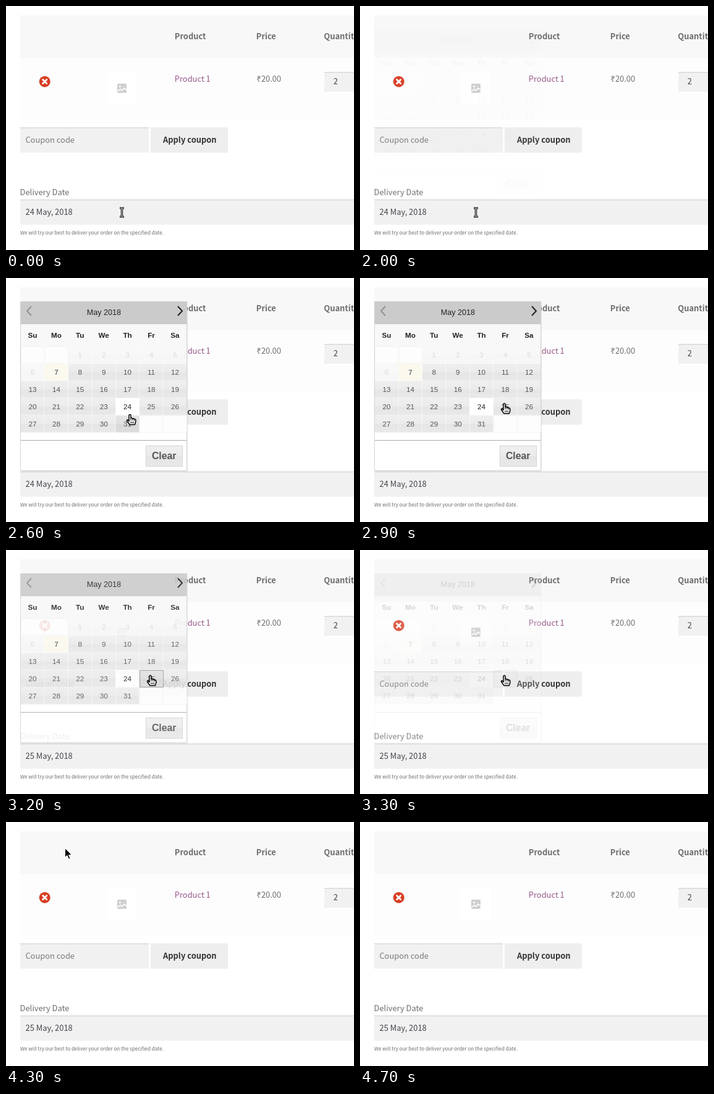
Write an HTML page that moves like this. It is 563 by 396 pixels and loops after 5.4 s.

```html
<!DOCTYPE html>
<html lang="en">
<head>
<meta charset="utf-8">
<title>Delivery date picker</title>
<style>
html, body { margin: 0; width: 100%; height: 100%; overflow: hidden; background: #fff; }
svg { display: block; width: 563px; height: 396px; }
text { font: 12.9px "Noto Sans CJK JP", "Noto Sans CJK SC", "Noto Sans", sans-serif; fill: #6d6d6d; white-space: pre; }
text.b { font-weight: 600; }
#cal text { font: 11.7px "Liberation Sans", Arial, sans-serif; text-anchor: middle; fill: #555; }
#cal text.th { font-weight: 700; fill: #222; }
#cal text.title { font-size: 12.6px; fill: #222; }
#cal text.clear { font-size: 15.8px; font-weight: 700; }
</style>
</head>
<body>
<svg viewBox="0 0 563 396" xmlns="http://www.w3.org/2000/svg">
  <defs>
    <linearGradient id="cell" x2="0" y2="1">
      <stop offset="0" stop-color="#efefef"/><stop offset=".5" stop-color="#ebebeb"/>
      <stop offset=".5" stop-color="#e5e5e5"/><stop offset="1" stop-color="#e9e9e9"/>
    </linearGradient>
    <linearGradient id="hover" x2="0" y2="1">
      <stop offset="0" stop-color="#e4e4e4"/><stop offset=".5" stop-color="#dfdfdf"/>
      <stop offset=".5" stop-color="#d8d8d8"/><stop offset="1" stop-color="#dcdcdc"/>
    </linearGradient>
    <filter id="soft" x="-5%" y="-5%" width="110%" height="110%"><feGaussianBlur stdDeviation="1.2"/></filter>
  </defs>
  <g id="page"></g>
  <g id="cal"></g>
  <g id="beam" fill="none">
    <path d="M-3.5 -7H-1.5L0 -6L1.5 -7H3.5M0 -6V6M-3.5 7H-1.5L0 6L1.5 7H3.5" stroke="#000" stroke-width="3.2"/>
    <path d="M-3 -7H-1.5L0 -6L1.5 -7H3M0 -6V6M-3 7H-1.5L0 6L1.5 7H3" stroke="#fff" stroke-width="1"/>
  </g>
  <path id="arrow" d="M.5 .5V15.5L4 12.3L6.5 18.3L9 17.2L6.5 11.5H11.3Z" fill="#000" stroke="#fff"/>
  <g id="hand" stroke-linejoin="round" stroke-linecap="round">
    <path d="M-1.5 9.5V.2Q-1.5 -1.5 0 -1.5Q1.5 -1.5 1.5 .2V4.5Q3 3.6 4.3 5.2Q5.8 4.5 6.9 6Q9 5.5 9.3 7.8V10.5L7.8 15H-.5L-4.8 9Q-5.4 7 -3.8 6.9Z" fill="#fff" stroke="#000" stroke-width="1.5"/>
    <path d="M1.5 5V8M4.3 5.8V8M6.9 6.5V8.3M1.4 10.5V12.5M3.6 10.5V12.5M5.8 10.5V12.5" fill="none" stroke="#000"/>
  </g>
</svg>
<script>
const $ = id => document.getElementById(id);
const rect = (x, y, w, h, fill, extra = '') =>
  `<rect x="${x}" y="${y}" width="${w}" height="${h}" fill="${fill}" ${extra}/>`;
const text = (x, y, s, extra = '') => `<text x="${x}" y="${y}" ${extra}>${s}</text>`;
const field = (x, y, w, h) =>
  rect(x, y, w, h, '#f1f1f1') + rect(x, y, w, 1, '#d4d4d4') + rect(x, y + 1, w, 1, '#eaeaea');

function buildPage() {
  const dark = 'style="fill:#43454b"';
  return rect(23, 15, 540, 69, '#f8f8f8') + rect(23, 84, 540, 100, '#fdfdfd') +
    text(272.8, 54, 'Product', 'class="b"') +
    text(404.8, 54, 'Price', 'class="b"') +
    text(514.3, 54, 'Quantity', 'class="b"') +
    '<circle cx="62.7" cy="122.7" r="9" fill="#d83d22"/>' +
    '<path d="M59.6 119.6l6.2 6.2m0-6.2l-6.2 6.2" stroke="#fff" stroke-width="2.8" stroke-linecap="round"/>' +
    rect(163, 108, 48, 50, '#fff') +
    rect(180, 126, 15, 15, '#cfcfcf', 'rx="2"') +
    '<circle cx="184.5" cy="130.5" r="1.6" fill="#fff"/>' +
    '<path d="M181 138l4-3 3 2 3-4 4 3" fill="none" stroke="#fff" stroke-width="1.6"/>' +
    text(272.8, 123, 'Product 1', 'style="fill:#96588a"') +
    text(405.6, 123, '₹20.00') +
    field(515, 107, 48, 32) + text(529.8, 127, '2', dark) +
    field(23, 197, 208, 41) + text(31.4, 222, 'Coupon code', 'style="fill:#7a7a7a"') +
    rect(234, 197, 125, 41, '#eee') + text(254, 222, 'Apply coupon', 'class="b" style="fill:#333"') +
    text(22.6, 307, 'Delivery Date') +
    field(23, 314, 540, 41) + text(31.5, 339, '24 May, 2018', 'id="date" ' + dark) +
    text(23, 371, 'We will try our best to deliver your order on the specified date.', 'style="font-size:8.06px"');
}

function buildCalendar() {
  const colX = c => 24 + c * 38.4;
  let s = rect(24, 39, 269, 274, '#999', 'opacity=".6" filter="url(#soft)"') +
    rect(23.5, 38.5, 269, 274, '#fff', 'stroke="#d5d5d5"') +
    rect(24, 38, 268, 37, '#cbcbcb') +
    text(158.3, 60, 'May 2018', 'class="title"') +
    '<g fill="none" stroke-width="2"><path d="M41 46l-7 7.5 7 7.5" stroke="#929292"/>' +
    '<path d="M278 46l7 7.5-7 7.5" stroke="#222"/></g>' +
    rect(24, 75, 268, 36, '#f8f8f8') + rect(24, 111, 268, 140, '#fdfdfd');
  ['Su', 'Mo', 'Tu', 'We', 'Th', 'Fr', 'Sa'].forEach((d, c) => {
    s += text(colX(c) + 19, 97, d, 'class="th"');
  });
  for (let i = 0; i < 35; i++) {
    const day = i - 1, x = colX(i % 7), y = 111 + 28 * Math.floor(i / 7);
    if (day < 1 || day > 31) {
      s += rect(x + .5, y + .5, 37.4, 27, 'none', 'stroke="#f5f5f5"');
      continue;
    }
    const past = day < 7;
    const fill = day === 7 ? '#fbf9ee' : day === 24 ? '#fff' : 'url(#cell)';
    const ink = day === 7 ? '#363636' : day === 24 ? '#212121' : '#555';
    s += rect(x, y, 37.8, 27.6, fill, `id="d${day}" ${past ? 'opacity=".3"' : ''}`) +
      text(x + 19, y + 46 - 28 + .2, day, `style="fill:${past ? '#dadada' : ink}"`);
  }
  return s + rect(216.5, 195.5, 38, 27, 'none', 'id="focus" stroke="#444" stroke-dasharray="1 1"') +
    rect(24, 263, 268, 1, '#aaa') +
    rect(226.5, 272.5, 59, 33, 'url(#cell)', 'stroke="#d3d3d3"') +
    text(255.7, 294, 'Clear', 'class="clear"');
}

$('page').innerHTML = buildPage();
$('cal').innerHTML = buildCalendar();

// Pointer steps: time, shape, x, y
const steps = [
  [0, 'beam', 187.5, 335], [2200, 'beam', 185, 322], [2300, 'arrow', 178, 285],
  [2400, 'arrow', 170, 254], [2600, 'hand', 200.5, 223], [2700, 'hand', 211, 219],
  [2800, 'hand', 224, 211], [2900, 'hand', 233.5, 205], [3400, 'hand', 229, 208],
  [3500, 'beam', 222, 218], [3600, 'beam', 219, 224], [3900, 'beam', 214.5, 230],
  [4000, 'beam', 200, 205], [4100, 'arrow', 165, 150], [4200, 'arrow', 125, 90],
  [4300, 'arrow', 95, 42], [4400, 'arrow', 75, 6], [4500, 'arrow', 74, 3],
  [4600, 'arrow', 73, -6], [4700, '', 0, 0]
];
const LOOP = 5400, TICK = 100, FADE = 200;
const swing = p => .5 - Math.cos(Math.PI * Math.min(1, Math.max(0, p))) / 2;

function draw(t) {
  const [, shape, x, y] = steps.findLast(s => s[0] <= t);
  for (const id of ['beam', 'arrow', 'hand']) {
    $(id).style.display = id === shape ? '' : 'none';
  }
  if (shape) $(shape).setAttribute('transform', `translate(${x} ${y})`);

  const alpha = swing((t - 1978) / FADE) - swing((t - 3156) / FADE);
  $('cal').style.display = alpha > .002 ? '' : 'none';
  $('cal').style.opacity = alpha;

  const picked = t >= 3100;
  $('date').textContent = (picked ? 25 : 24) + ' May, 2018';
  $('focus').style.display = picked ? '' : 'none';
  $('d25').setAttribute('fill', picked ? 'url(#hover)' : 'url(#cell)');
  $('d31').setAttribute('fill', t >= 2600 && t < 2700 ? 'url(#hover)' : 'url(#cell)');
}

const start = performance.now();
function frame() {
  const t = (performance.now() - start) % LOOP;
  draw(Math.floor(t / TICK) * TICK);
  requestAnimationFrame(frame);
}
frame();
</script>
</body>
</html>
```
